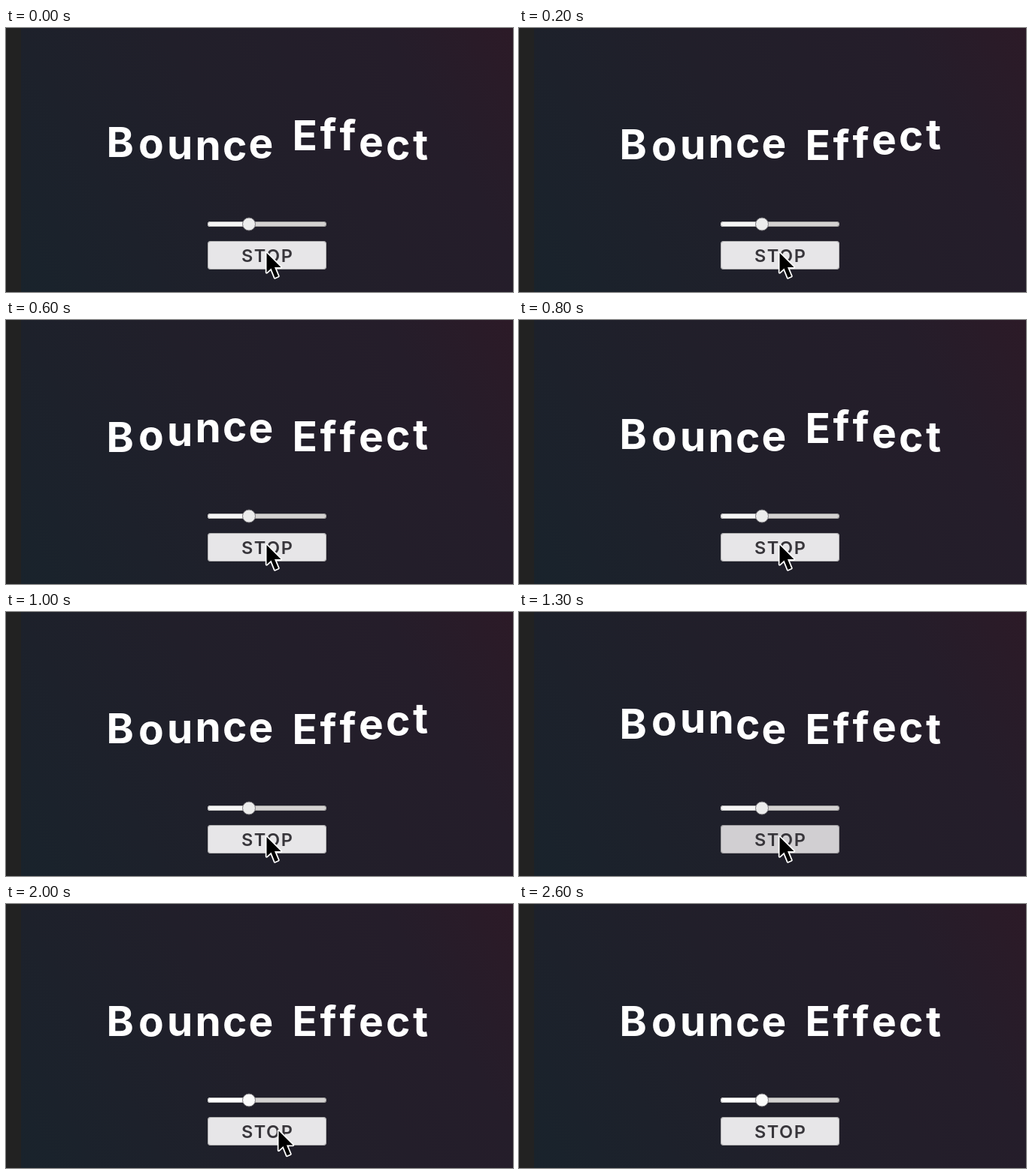
Recreate the animation shown at these times as an HTML page with a canvas. Size 674 by 352 pixels, loop 3500 ms.

```html
<!DOCTYPE html>
<html lang="en">
<head>
<meta charset="utf-8">
<title>Bounce Effect</title>
<style>
html, body { margin: 0; width: 100%; height: 100%; overflow: hidden; }
body {
  background:
    linear-gradient(#222, #222) 0 0 / 20px 100% no-repeat,
    linear-gradient(61deg, #19232c, #211f2a 45%, #251d2a 80%, #2c1a27) 20px 0 / 654px 352px no-repeat #222;
}
canvas { display: block; }
</style>
</head>
<body>
<canvas id="stage" width="674" height="352"></canvas>
<script>
const ctx = document.getElementById('stage').getContext('2d');
const LOOP = 3500, STEP = 100;
const PRESS = 1300, STOPPED = 1500;
const WAVE = 16;          // wave length, in letters
const BASELINE = 176;

const title = 'Bounce Effect';
const centers = [152.5, 193, 231, 268.5, 304.5, 339, 0, 397.5, 428.5, 454.5, 485.5, 521.5, 551];

// Cursor tip positions, each held until the next one.
const cursorStops = [
  [0, 346.5, 300], [2000, 362.5, 302.5], [2300, 364.5, 303], [2500, 419.5, 313], [2600, -99, -99]
];
const cursorShape = new Path2D('M0 0V26L6 20.5L11 33L15.5 31L10.5 19H19Z');

const hump = (s, center, halfWidth, height) => {
  const x = Math.abs(s - center) / halfWidth;
  return x < 1 ? height * (1 + Math.cos(Math.PI * x)) / 2 : 0;
};

// Height of a letter, s letters behind the head of the wave.
function lift(s) {
  const main = s < 2.4 ? 15.3 * Math.sin(s / 2.4 * Math.PI / 2) : hump(s, 2.4, 4.4, 15.3);
  return main + hump(s, 10.6, 3, 4) + hump(s, 15, 1.5, 1.5);
}

function drawTitle(time) {
  const head = 10.5 + time * 0.0202;
  ctx.font = '700 55px Inter, sans-serif';
  ctx.textAlign = 'left';
  ctx.letterSpacing = '0px';
  ctx.fillStyle = '#fff';
  [...title].forEach((letter, i) => {
    if (letter === ' ') return;
    const box = ctx.measureText(letter);
    const x = centers[i] - (box.actualBoundingBoxRight - box.actualBoundingBoxLeft) / 2;
    const s = (head - i + WAVE) % WAVE;
    ctx.fillText(letter, x, BASELINE - (time < STOPPED ? lift(s) : 0));
  });
}

function bar(x, y, width, height, radius, color) {
  ctx.beginPath();
  ctx.roundRect(x, y, width, height, radius);
  ctx.fillStyle = color;
  ctx.fill();
}

// Thin dark edge just inside a bar.
function edge(x, y, width, height, radius) {
  ctx.beginPath();
  ctx.roundRect(x + 0.5, y + 0.5, width - 1, height - 1, radius);
  ctx.lineWidth = 1;
  ctx.strokeStyle = 'rgba(0, 0, 0, 0.25)';
  ctx.stroke();
}

function drawControls(time) {
  const running = time < STOPPED;
  bar(268, 258, 158, 7, 3.5, '#d4d2d1');
  bar(268, 258, 55, 7, 3.5, running ? '#f6f6f6' : '#fff');
  edge(268, 258, 158, 7, 3);
  ctx.beginPath();
  ctx.arc(323, 261.5, 8.5, 0, 7);
  ctx.fillStyle = running ? '#ececec' : '#fbfbfb';
  ctx.fill();
  ctx.strokeStyle = '#77757a';
  ctx.stroke();

  bar(268, 284, 158, 38, 4, time >= PRESS && running ? '#d1cfd2' : '#e7e6e8');
  edge(268, 284, 158, 38, 3.5);
  ctx.font = '600 23.5px Inter, sans-serif';
  ctx.letterSpacing = '1.6px';
  ctx.textAlign = 'left';
  ctx.fillStyle = '#38363b';
  ctx.fillText('STOP', 313, 312);
}

function drawCursor(time) {
  const [, x, y] = cursorStops.findLast(stop => stop[0] <= time);
  ctx.save();
  ctx.translate(x, y);
  ctx.lineWidth = 3.5;
  ctx.lineJoin = 'round';
  ctx.strokeStyle = '#fff';
  ctx.stroke(cursorShape);
  ctx.fillStyle = '#000';
  ctx.fill(cursorShape);
  ctx.restore();
}

function frame() {
  const time = Math.floor(performance.now() % LOOP / STEP) * STEP;
  ctx.clearRect(0, 0, 674, 352);
  drawTitle(time);
  drawControls(time);
  drawCursor(time);
  requestAnimationFrame(frame);
}
frame();
</script>
</body>
</html>
```
